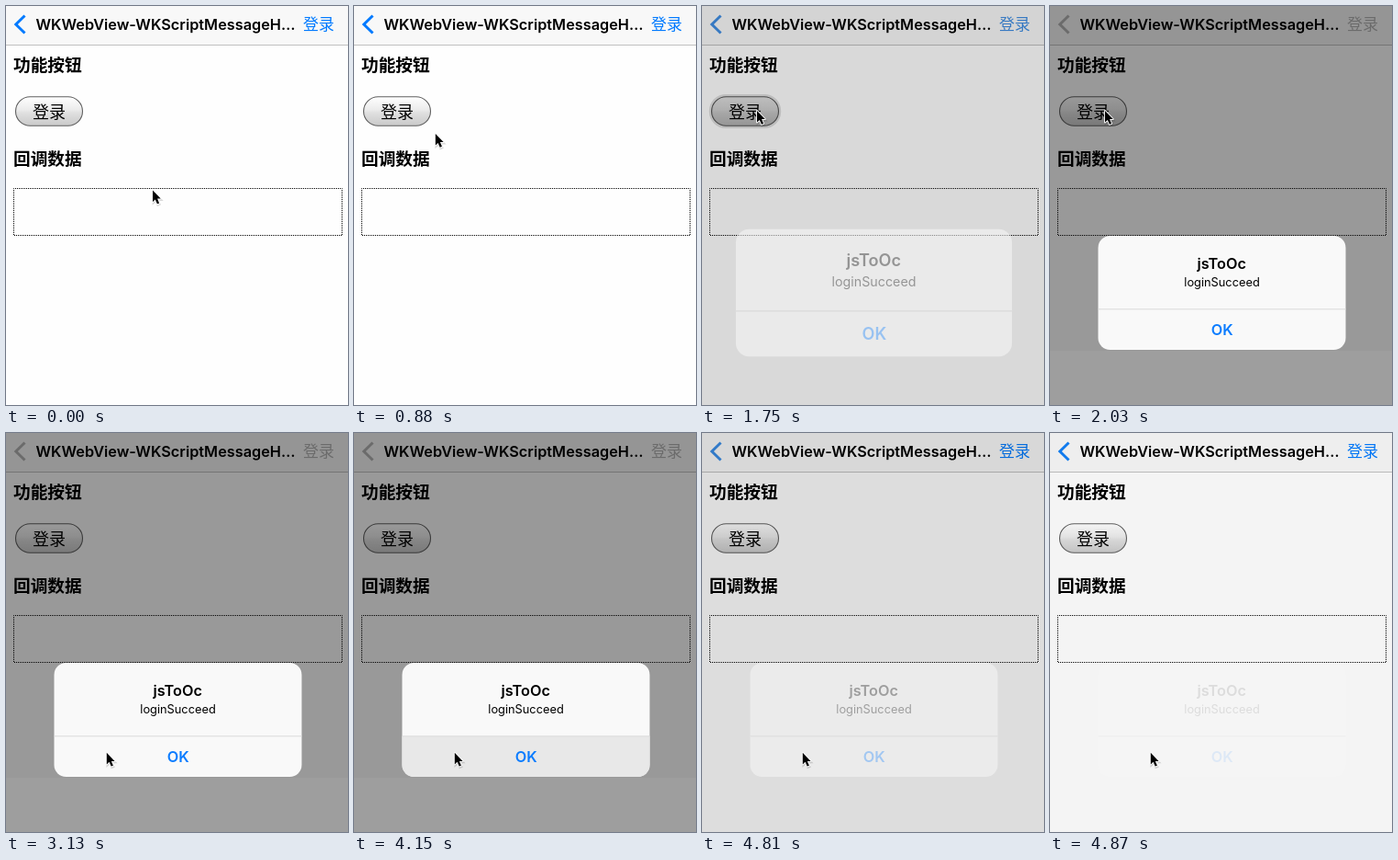
Write an HTML page that moves like this. It is 373 by 434 pixels and loops after 4970 ms.

```html
<!DOCTYPE html>
<html lang="zh-CN">
<head>
<meta charset="utf-8">
<title>Web view login</title>
<style>
  html, body { margin: 0; width: 100%; height: 100%; overflow: hidden; background: #fefefe; }
  svg { display: block; width: 373px; height: 434px; }
  text { font-family: Inter, "Noto Sans CJK SC", "Noto Sans CJK", sans-serif; }
  .title { font-size: 16.3px; font-weight: 600; text-anchor: middle; }
  .mid { text-anchor: middle; }
  .heading { font-size: 18.7px; font-weight: 700; }
</style>
</head>
<body>
<svg viewBox="0 0 373 434">
  <defs>
    <linearGradient id="face" x2="0" y2="1">
      <stop offset="0" stop-color="#fff"/>
      <stop offset=".45" stop-color="#ebebeb"/>
      <stop offset=".55" stop-color="#e0e0e0"/>
      <stop offset="1" stop-color="#c9c9c9"/>
    </linearGradient>
    <path id="arrow" d="M0 0V12.6L2.8 10L4.9 14.8L7.1 13.9L5.1 9.1H8.8Z"/>
  </defs>

  <rect width="373" height="434" fill="#fefefe"/>
  <rect width="373" height="42" fill="#f8f8f8"/>
  <rect y="42" width="373" height="1" fill="#c0c0c0"/>
  <text class="title" x="174" y="26">WKWebView-WKScriptMessageH…</text>

  <text class="heading" x="8" y="71">功能按钮</text>
  <rect x="10.5" y="98.7" width="73" height="31.6" rx="15.8" fill="url(#face)" stroke="#606060" stroke-width="1.1"/>
  <text class="mid" x="47" y="121.5" font-size="18">登录</text>
  <rect id="tap" x="7.8" y="96" width="78.4" height="37" rx="18"/>
  <text class="heading" x="8" y="172.7">回调数据</text>
  <rect x="8.5" y="198.5" width="358" height="51" fill="none" stroke="#000" stroke-dasharray="1 1" stroke-dashoffset=".5"/>

  <path id="back" d="M20.5 10.5L10.8 20L20.5 29.5" fill="none" stroke-width="3"/>
  <text id="action" class="mid" x="341" y="26.3" font-size="17">登录</text>

  <rect id="dim" width="373" height="434"/>
  <rect id="strip" y="375" width="373" height="59" fill="#fff" opacity=".05"/>

  <g id="alert">
    <g id="panel">
      <rect x="52.5" y="250" width="270" height="124" rx="13" fill="#f9f9f9"/>
      <path id="pressed" d="M52.5 330H322.5V361A13 13 0 0 1 309.5 374H65.5A13 13 0 0 1 52.5 361Z" fill="#e8e8e8"/>
      <rect x="52.5" y="329.3" width="270" height="1" fill="#dadada"/>
    </g>
    <g id="labels">
      <text class="title" x="187.3" y="285.8">jsToOc</text>
      <text class="mid" x="187.5" y="305.4" font-size="12.8">loginSucceed</text>
      <text class="title" x="187.8" y="358" fill="#0a7cff">OK</text>
    </g>
  </g>

  <g id="cursor">
    <use href="#arrow" x=".6" y="1.4" stroke="#000" stroke-width="2" opacity=".14"/>
    <use href="#arrow" fill="#fff" stroke="#fff" stroke-width="1.8" stroke-linejoin="round"/>
    <use href="#arrow"/>
  </g>
</svg>

<script>
const LOOP = 4970;
const DIM = 0.4;
const START = [160, 200.5], BUTTON = [60, 114], OK = [109.8, 347.8];
const BLUE = [0, 122, 255], GRAY = [178, 178, 178];

const parts = {};
for (const node of document.querySelectorAll('svg > [id], #alert [id]')) parts[node.id] = node;

const set = (id, name, value) => parts[id].setAttribute(name, value);
const mix = (a, b, k) => a.map((v, i) => v + (b[i] - v) * k);
const tint = k => `rgb(${mix(BLUE, GRAY, k).map(Math.round)})`;
const within = (t, from, to) => t >= from && t < to;

// Progress in n equal jumps: the first at `from`, the last at `to`.
function stepped(t, from, to, n) {
  if (t < from) return 0;
  const jump = Math.floor((t - from) / (to - from) * (n - 1) + 0.05);
  return Math.min(1, (jump + 1) / n);
}

const glide = p => (1 - Math.cos(Math.PI * p ** 0.8)) / 2;

function cursorAt(t) {
  return t < 2440
    ? mix(START, BUTTON, glide(stepped(t, 480, 1220, 14)))
    : mix(BUTTON, OK, glide(stepped(t, 2440, 3130, 13)));
}

function alertPresence(t) {
  if (t < 4630) return 1 - (1 - stepped(t, 1750, 1980, 5)) ** 2;
  const held = Math.min(4870, 4630 + 60 * Math.floor((t - 4630) / 60));
  return (1 + Math.cos(Math.PI * (held - 4604) / 334)) / 2;
}

function render(t) {
  const shown = alertPresence(t);
  const leaving = t >= 4630;
  const tap = t < 1750 ? stepped(t, 1460, 1630, 4) : leaving ? 0 : 1 - shown;
  const scale = leaving ? 1 : 1 + 0.18 * (1 - shown);

  set('tap', 'opacity', 0.2 * tap);
  set('back', 'stroke', tint(shown));
  set('action', 'fill', tint(leaving ? shown ** 3 : shown));
  set('dim', 'opacity', DIM * shown);
  set('strip', 'visibility', within(t, 1980, 4630) ? 'visible' : 'hidden');
  set('alert', 'transform', `translate(187.5 312) scale(${scale}) translate(-187.5 -312)`);
  set('panel', 'opacity', shown ** 0.6);
  set('labels', 'opacity', shown);
  set('pressed', 'visibility', within(t, 4150, 4630) ? 'visible' : 'hidden');
  set('cursor', 'transform', `translate(${cursorAt(t)})`);
}

const origin = performance.now();
function tick() {
  render((performance.now() - origin) % LOOP);
  requestAnimationFrame(tick);
}
tick();
</script>
</body>
</html>
```
